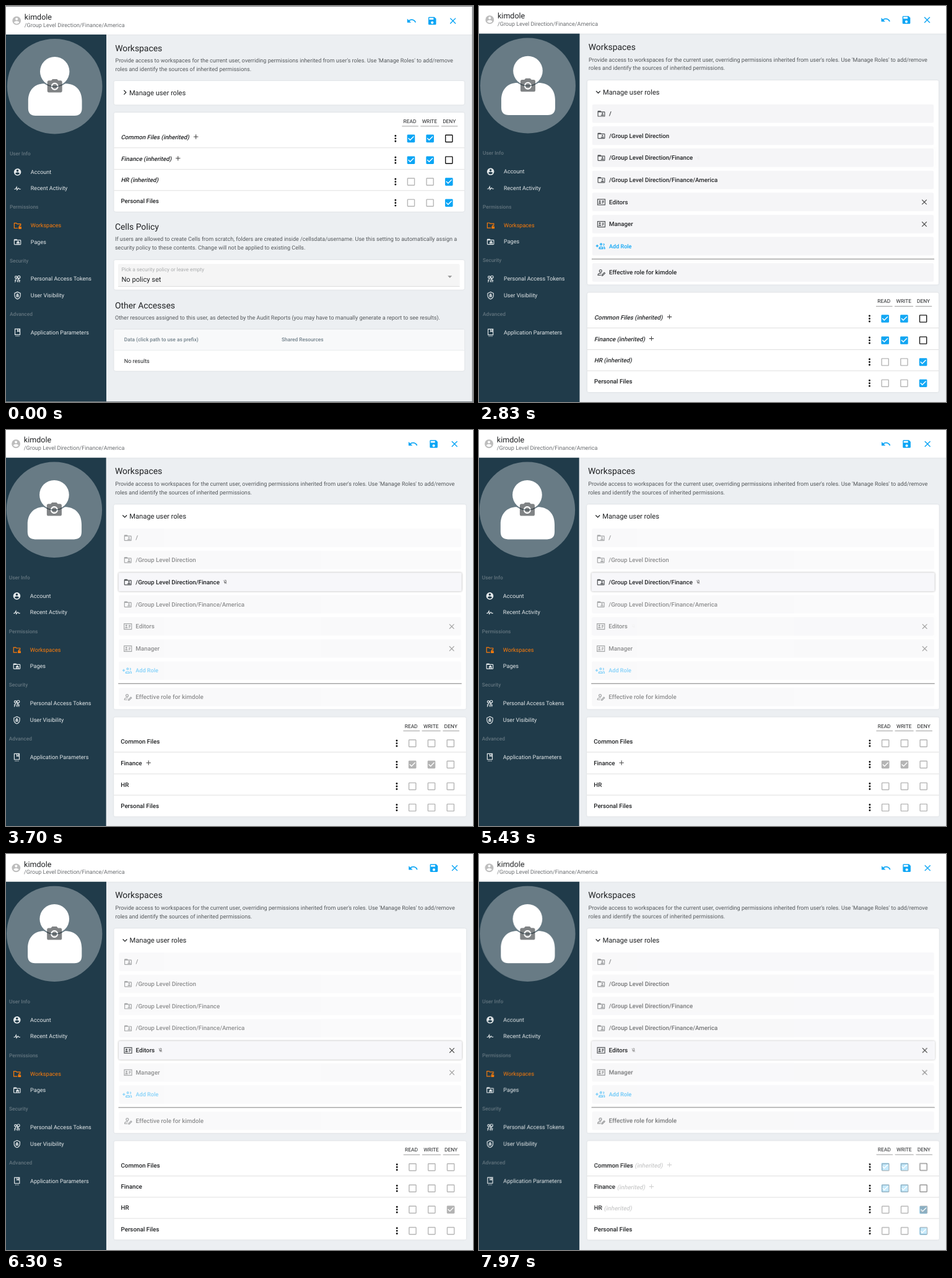
An HTML page for the animation above (8000 ms loop, 754 by 639 pixels).

```html
<!DOCTYPE html>
<html lang="en">
<head>
<meta charset="utf-8">
<title>User workspaces</title>
<style>
html, body { margin: 0; width: 100%; height: 100%; overflow: hidden; background: #fff; }
svg { display: block; width: 754px; height: 639px; }
text { font-family: Roboto, "Open Sans", sans-serif; text-rendering: geometricPrecision; white-space: pre; }
.card { filter: drop-shadow(0 .5px 1px rgba(0, 0, 0, .1)); }
.raised { filter: drop-shadow(0 .7px 1.6px rgba(0, 0, 0, .34)); }
</style>
</head>
<body>
<svg id="stage" viewBox="0 0 754 639" xmlns="http://www.w3.org/2000/svg"></svg>
<script>
const BLUE = '#0aa5f5', INK = '#202224', USER = 'kimdole';
const PATH = '/Group Level Direction/Finance';
// Font sizes of the interface
const XS = 8.35, SM = 9.05, MD = 9.74, LG = 11.13, XL = 12.5, H = 13.92;

const FOLDER = 'M20,18H4V8H20M20,6H12L10,4H4A2,2 0 0,0 2,6V18A2,2 0 0,0 4,20H20A2,2 0 0,0 22,18V8A2,2 0 0,0 20,6Z';
const BOX = 'M19,3H5C3.89,3 3,3.89 3,5V19A2,2 0 0,0 5,21H19A2,2 0 0,0 21,19V5C21,3.89 20.1,3 19,3';
const fillIcon = {
  account: 'M12,19.2C9.5,19.2 7.29,17.92 6,16C6.03,14 10,12.9 12,12.9C14,12.9 17.97,14 18,16C16.71,17.92 14.5,19.2 12,19.2M12,5A3,3 0 0,1 15,8A3,3 0 0,1 12,11A3,3 0 0,1 9,8A3,3 0 0,1 12,5M12,2A10,10 0 0,0 2,12A10,10 0 0,0 12,22A10,10 0 0,0 22,12C22,6.47 17.5,2 12,2Z',
  pulse: 'M3,13H5.79L10.1,4.79L11.28,13.75L14.5,9.66L17.83,13H21V15H17L14.67,12.67L9.92,18.73L8.94,11.31L7,15H3V13Z',
  pages: FOLDER + 'M10 18V14H8.2L13.5 9L18.8 14H17V18H14.6V15H12.4V18Z',
  group: FOLDER + 'M15 9A2 2 0 0 1 15 13A2 2 0 0 1 15 9M11 17V16C11 14.6 13.6 14 15 14S19 14.6 19 16V17Z',
  undo: 'M12.5,8C9.85,8 7.45,9 5.6,10.6L2,7V16H11L7.38,12.38C8.77,11.22 10.54,10.5 12.5,10.5C16.04,10.5 19.05,12.81 20.1,16L22.47,15.22C21.08,11.03 17.15,8 12.5,8Z',
  save: 'M17,3H5C3.89,3 3,3.9 3,5V19A2,2 0 0,0 5,21H19A2,2 0 0,0 21,19V7L17,3M12,19A3,3 0 0,1 9,16A3,3 0 0,1 12,13A3,3 0 0,1 15,16A3,3 0 0,1 12,19M15,9H5V5H15V9Z',
  close: 'M19,6.41L17.59,5L12,10.59L6.41,5L5,6.41L10.59,12L5,17.59L6.41,19L12,13.41L17.59,19L19,17.59L13.41,12Z',
  checked: 'M10,17L5,12L6.41,10.58L10,14.17L17.59,6.58L19,8' + BOX + 'Z',
  blank: BOX + 'M19,5V19H5V5H19Z',
  camera: 'M9 2L7.17 4H4c-1.1 0-2 .9-2 2v12c0 1.1.9 2 2 2h16c1.1 0 2-.9 2-2V6c0-1.1-.9-2-2-2h-3.17L15 2H9zm3 15c-2.76 0-5-2.24-5-5s2.24-5 5-5 5 2.24 5 5-2.24 5-5 5zM12 8.8A3.2 3.2 0 0 0 12 15.2A3.2 3.2 0 0 0 12 8.8Z',
  dots: 'M12 4A2 2 0 0 1 12 8A2 2 0 0 1 12 4M12 10A2 2 0 0 1 12 14A2 2 0 0 1 12 10M12 16A2 2 0 0 1 12 20A2 2 0 0 1 12 16'
};
const lineIcon = {
  lockFolder: 'M13 19H3V5H9L11 7H21V11M16 16H22V20H16ZM16 18H22M17 15V13.5A2 2 0 0 1 21 13.5',
  keys: 'M8 4A3 3 0 0 1 8 10A3 3 0 0 1 8 4M16 3A3 3 0 0 1 16 10A3 3 0 0 1 16 3M9 10L5 21M7 16L4 15M15 10L18 21M13 10V21M17 16H20M10 18H13',
  shield: 'M12 2.2L4 5.8V11C4 16 7.4 20.6 12 22C16.6 20.6 20 16 20 11V5.8ZM9.5 12H14.5V15.5H9.5ZM10.3 11V9.5A1.7 1.7 0 0 1 13.7 9.5V11',
  params: 'M5 2H19V18H5ZM12 2V9L14.2 7.5L16.5 9V2M7 22H9M11 22H13M15 22H17',
  card: 'M2 4.5H22V19.5H2ZM14 9H19M14 12H19M14 15H17M8 8A1.4 1.4 0 0 1 8 11A1.4 1.4 0 0 1 8 8M5.5 15.5C5.5 13.6 10.5 13.6 10.5 15.5Z',
  addRole: 'M-1 11H6M2.5 7.5V14.5M13 4.5A2.2 2.2 0 0 1 13 9A2.2 2.2 0 0 1 13 4.5M19 5A2 2 0 0 1 19 9.5M8 18.5V17C8 13 18 13 18 17V18.5ZM20 13C22 13.5 23 15 23 18.5H21',
  edit: 'M10 4.5A3.2 3.2 0 0 1 10 11A3.2 3.2 0 0 1 10 4.5M11 19H3V17.5C3 14.5 8 13.5 12 14.2M13.5 20.5V18.5L20 12L22 14L15.5 20.5Z',
  pin: 'M4 3L20 21M9 3H17V11L19 14H14M9 9V11L7 14H12V21',
  right: 'M9.5 6.5L15 12L9.5 17.5',
  down: 'M6.5 9.5L12 15L17.5 9.5',
  plus: 'M12 5V19M5 12H19'
};

const icon = (name, x, y, k, color) => {
  const d = fillIcon[name];
  const paint = d ? `fill="${color}"` : `fill="none" stroke="${color}" stroke-width="2"`;
  return `<path d="${d || lineIcon[name]}" ${paint} transform="translate(${x} ${y}) scale(${k}) translate(-12 -12)"/>`;
};
// y is the middle of the capital letters; slant gives oblique letters
const text = (x, y, s, size, color = INK, attrs = '', slant = 0) =>
  `<text transform="translate(${x} ${y + .355 * size}) skewX(${-slant})" font-size="${size}" fill="${color}" ${attrs}>${s}</text>`;
const rect = (x, y, w, h, fill, attrs = '') =>
  `<rect x="${x}" y="${y}" width="${w}" height="${h}" fill="${fill}" ${attrs}/>`;
const card = (y, h) => rect(175, y, 567, h, '#fff', 'rx="2.5" class="card"');
const BOLD = 'font-weight="500"';

function header() {
  return rect(-5, -5, 770, 49.6, '#fff', 'class="card"')
    + icon('account', 17.3, 22.2, .69, '#bdbdbd')
    + text(30, 16, USER, XL)
    + text(30, 29, PATH + '/America', SM, '#6c6f72')
    + icon('undo', 656.5, 22.5, .7, BLUE)
    + icon('save', 690, 22.5, .7, BLUE)
    + icon('close', 723.5, 22.5, .7, BLUE);
}

function avatar() {
  return '<circle cx="79" cy="128.5" r="77" fill="#687b85"/>'
    + '<path fill="#fff" d="M36 164V152C36 134 47 124 62 124Q79 135 96 124C112 124 123 134 123 152V164Q123 176 111 176H48Q36 176 36 164Z"/>'
    + '<circle cx="79" cy="104.5" r="23.8" fill="#fff"/>'
    + icon('camera', 79, 128.7, 1.2, 'rgba(20, 26, 30, .54)');
}

function sidebar() {
  const groups = [[237.5, 'User Info'], [324, 'Permissions'], [410.5, 'Security'], [497, 'Advanced']];
  const items = [
    [267, 'account', 'Account'], [293.5, 'pulse', 'Recent Activity'],
    [353.8, 'lockFolder', 'Workspaces'], [380.2, 'pages', 'Pages'],
    [440.2, 'keys', 'Personal Access Tokens'], [466.8, 'shield', 'User Visibility'],
    [526.8, 'params', 'Application Parameters']
  ];
  return rect(-5, 44.6, 167.5, 610, '#203b4a') + avatar()
    + groups.map(([y, s]) => text(6, y, s, XS, '#63757f', BOLD)).join('')
    + items.map(([y, name, s]) => {
      const color = s === 'Workspaces' ? '#ff7d0a' : '#e4e9eb';
      return icon(name, 18.7, y + .3, .58, color) + text(40, y, s, SM, color);
    }).join('');
}

function intro() {
  return text(176.7, 66.3, 'Workspaces', H)
    + text(177, 86.3, "Provide access to workspaces for the current user, overriding permissions inherited from user's roles. Use 'Manage Roles' to add/remove", SM, '#54585b')
    + text(177, 100.2, 'roles and identify the sources of inherited permissions.', SM, '#54585b');
}

function roles(active) {
  const rows = [
    ['group', '/'], ['group', '/Group Level Direction'], ['group', PATH], ['group', PATH + '/America'],
    ['card', 'Editors'], ['card', 'Manager'], ['addRole', 'Add Role'], ['edit', 'Effective role for ' + USER]
  ];
  const pinX = { 2: 354, 4: 249.5 };
  return card(120, 329.5) + icon('down', 192.5, 138.7, .62, INK) + text(200, 138.7, 'Manage user roles', LG)
    + rows.map(([name, s], i) => {
      const y = i < 7 ? 173.5 + 35.65 * i : 429.8;
      const on = i === active, add = i === 6;
      const back = on ? rect(182.5, y - 15, 552.5, 30, '#f7f7fa', 'rx="2" class="raised"')
        : rect(183, y - 14.8, 551, 29.8, '#f5f5f7', 'rx="2"');
      const color = add ? BLUE : INK;
      const alpha = active !== undefined && !on ? .5 : 1;
      return `<g opacity="${alpha}">` + back
        + icon(name, add ? 196.5 : 197.5, y + .3, .6, add ? BLUE : '#505356')
        + text(210, y, s, add ? SM : MD, color, BOLD)
        + (name === 'card' ? icon('close', 719, y + .3, .6, '#4c4c4c') : '')
        + (on ? icon('pin', pinX[i], y, .32, '#444') : '') + '</g>';
    }).join('')
    + rect(182, 407.7, 553, 1.3, '#9b9b9b');
}

// x: on, o: off, g: on and locked, -: off and locked
const boxes = { x: ['checked', BLUE], o: ['blank', '#111'], g: ['checked', '#b3b3b3'], '-': ['blank', '#b6b6b6'] };

function table(inherited, checks, plus) {
  const names = ['Common Files', 'Finance', 'HR', 'Personal Files'];
  const heads = [[643.3, 641, 26.5, 'READ'], [673.5, 671, 30, 'WRITE'], [707, 704.7, 26.5, 'DENY']];
  let out = '', top = 484.5;
  for (const [x, left, width, s] of heads) {
    out += text(x, 476.5, s, XS) + rect(left, 484, width, 1, '#a0a0a0');
  }
  names.forEach((s, i) => {
    // The plus button makes its row a little taller
    const height = plus[i] ? 35 : 34.2;
    const y = top + (plus[i] ? 17.9 : 17.1), boxY = top + 20;
    const soft = inherited && i < 3;
    if (i) out += rect(175, top - .5, 567, 1, '#e0e0e0');
    out += text(186, y, soft ? s + ' (inherited)' : s, MD, INK, BOLD, soft ? 13 : 0);
    if (plus[i]) out += icon('plus', plus[i], y - .8, .53, '#444');
    out += icon('dots', 630.5, boxY, .74, '#111');
    [...checks[i]].forEach((c, j) => {
      out += icon(boxes[c][0], 655.7 + 30.7 * j, boxY, .7, boxes[c][1]);
    });
    top += height;
  });
  return card(462.5, top - 462.5) + out;
}

function closedBody(grid) {
  const grey = '#54585b', label = '#71808a';
  return card(119.8, 38.3) + icon('right', 192.5, 138.3, .62, INK) + text(199.5, 138.5, 'Manage user roles', LG)
    + `<g transform="translate(0 -291.5)">${grid}</g>`
    + text(176.5, 355.9, 'Cells Policy', H)
    + text(176.5, 375.7, 'If users are allowed to create Cells from scratch, folders are created inside /cellsdata/username. Use this setting to automatically assign a', SM, grey)
    + text(176.5, 389.7, 'security policy to these contents. Change will not be applied to existing Cells.', SM, grey)
    + card(409.8, 48)
    + rect(181.5, 416, 553, 36.5, '#f5f5f5', 'rx="2"') + rect(181.5, 452, 553, 1, '#dedede')
    + text(187, 425.3, 'Pick a security policy or leave empty', XS, '#a9abac')
    + text(187, 440.9, 'No policy set', LG)
    + '<path d="M715 435.2H722L718.5 438.8Z" fill="#959595"/>'
    + text(176.5, 483, 'Other Accesses', H)
    + text(176.5, 503, 'Other resources assigned to this user, as detected by the Audit Reports (you may have to manually generate a report to see results).', SM, grey)
    + card(522.2, 67) + rect(175, 522.2, 567, 33, '#f8f9fa', 'rx="2.5"') + rect(175, 555.2, 567, 1, '#e7eaec')
    + text(191.3, 538.8, 'Data (click path to use as prefix)', XS, label, BOLD)
    + text(446.2, 538.8, 'Shared Resources', XS, label, BOLD)
    + text(191.3, 572.9, 'No results', SM);
}

// Each view sits at a slightly different zoom
const view = (id, [sx, sy, tx, ty], body, extra = '') =>
  `<g id="${id}"><g transform="matrix(${sx} 0 0 ${sy} ${tx} ${ty})">`
  + rect(-5, -5, 770, 660, '#eceff2') + header() + sidebar() + intro() + body + `</g>${extra}</g>`;

const merged = table(true, ['xxo', 'xxo', '--x', '--x'], [307.5, 278.5]);
const edges = rect(0, 0, 754, 1, '#77797b') + rect(0, 638, 754, 1, '#7b8387') + rect(752.5, 0, 1.5, 639, '#85898c');
const stage = document.getElementById('stage');
stage.innerHTML =
  view('open', [1, 1, 0, 0], roles() + merged)
  + view('finance', [1.0027, 1.0022, -1.3, 0], roles(2) + table(false, ['---', 'gg-', '---', '---'], [0, 230.8]))
  + view('editors', [1.0027, 1.0015, -1, .1], roles(4) + table(false, ['---', '---', '--g', '---'], []))
  + view('closed', [.9975, .9965, -.1, 1.6], closedBody(merged), edges);

const [finance, editors, closed] = ['finance', 'editors', 'closed'].map(id => document.getElementById(id));

function setAlpha(el, a) {
  el.style.opacity = a;
  el.style.display = a > 0 ? '' : 'none';
}

// Linear crossfade in 30 steps of 30 ms
const fade = (t, start) => Math.min(30, Math.max(0, Math.floor((t - start) / 30) + 1)) / 30;

function draw(t) {
  setAlpha(closed, t < 500 ? 1 : 0);
  setAlpha(finance, t < 6300 ? fade(t, 2830) : 0);
  setAlpha(editors, fade(t, 5430) * (1 - fade(t, 7790)));
}

const begin = performance.now();
function tick() {
  draw((performance.now() - begin) % 8000);
  requestAnimationFrame(tick);
}
draw(0);
requestAnimationFrame(tick);
</script>
</body>
</html>
```
